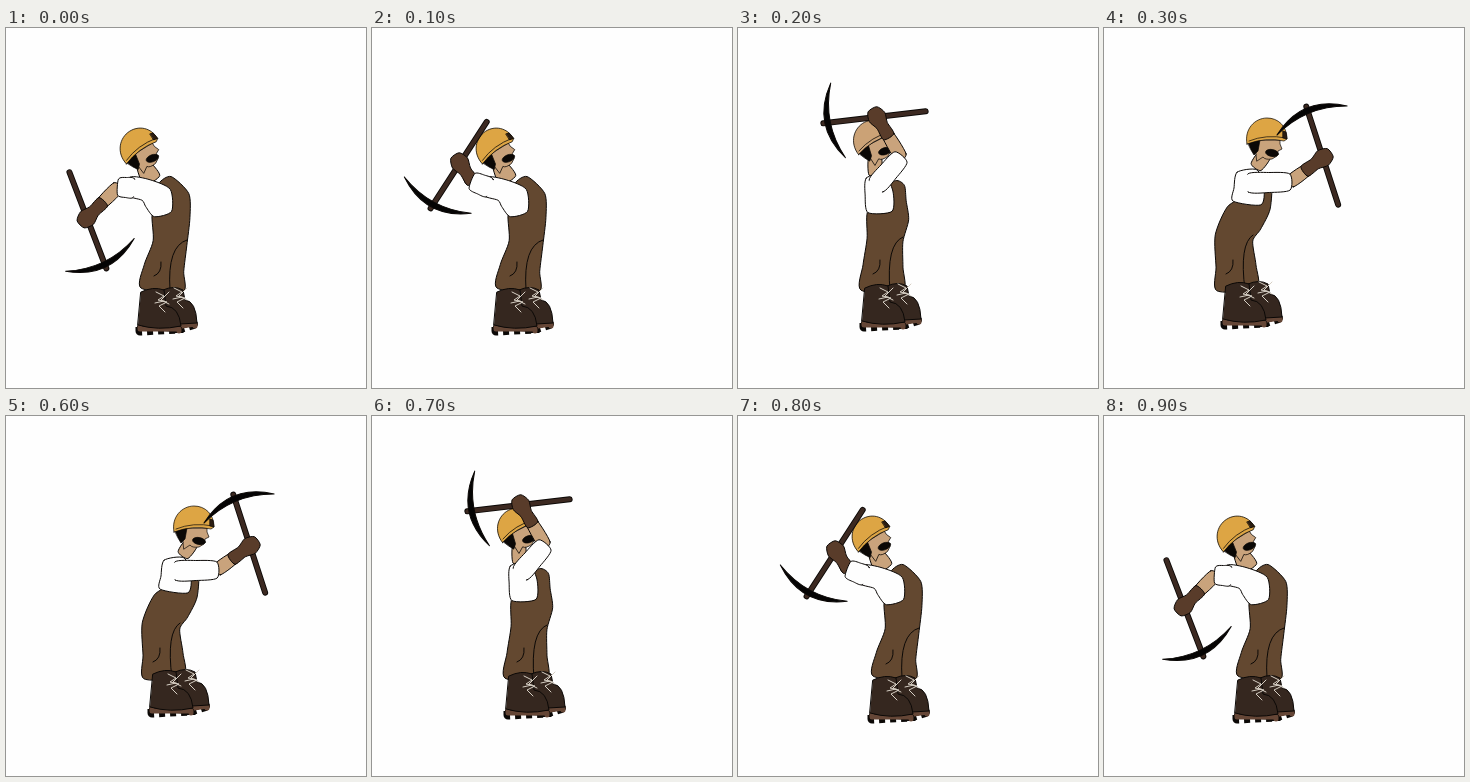
Animation, 360 px wide and 360 px high, one loop 1010 ms. Source, as an HTML page:

```html
<!DOCTYPE html>
<html>
<head>
<meta charset="utf-8">
<style>
html, body { margin: 0; width: 100%; height: 100%; overflow: hidden; background: #fefefe; }
svg { display: block; width: 100%; height: 100%; }
</style>
</head>
<body>
<svg id="stage" viewBox="0 0 360 360" stroke="#0b0806" stroke-linejoin="round" stroke-linecap="round"></svg>
<script>
const INK = '#0b0806', CLOTH = '#634830', GLOVE = '#593c2a', SKIN = '#c9a37c', SHIRT = '#fefefe',
      BOOT = '#35271f', SOLE = '#654636', WOOD = '#3c2921', HAT = '#dda544', DULL_HAT = '#cba276';

const path = (d, fill = 'none', extra = '') => `<path d="${d}" fill="${fill}" ${extra}/>`;
const at = (x, y, content, turn = 0) => `<g transform="translate(${x} ${y}) rotate(${turn})">${content}</g>`;

// Smooth closed outline around a centre line of [x, y, radius]
function tube(line, fill) {
  const side = sign => line.map(([x, y, r], i) => {
    const a = line[Math.max(i - 1, 0)], b = line[Math.min(i + 1, line.length - 1)];
    const dx = b[0] - a[0], dy = b[1] - a[1], k = sign * r / Math.hypot(dx, dy);
    return [x - dy * k, y + dx * k];
  });
  const edge = [...side(1), ...side(-1).reverse()];
  const p = i => edge[(i + edge.length) % edge.length];
  const d = edge.map((b, i) => {
    const a = p(i - 1), c = p(i + 1), e = p(i + 2);
    const lead = b.map((v, j) => v + (c[j] - a[j]) / 8);
    const tail = c.map((v, j) => v - (e[j] - b[j]) / 8);
    return `C${lead} ${tail} ${c}`;
  });
  return path(`M${edge[0]}${d.join('')}Z`, fill);
}

// The grip is the origin; the handle points along x
const pick =
  path('M-54,0H49', 'none', 'stroke-width="6"') +
  path('M-54,0H49', 'none', `stroke="${WOOD}" stroke-width="4.2"`) +
  at(-54, 0, path('M15,-38Q-12,0 15,38Q-1,0 15,-38Z', '#050404'), -4.5);

const lace = path('M150,264l8,4 -6,4 9,2 -8,4 6,6M163,264l-8,8 8,4M149,275l9,-2',
  'none', 'stroke="#d6cfc4" stroke-width="1"');

const sole = (from, to) =>
  path(`M${from}L${to}`, 'none', 'stroke-width="6"') +
  path(`M${from}l0,4L${to}l0,4`, 'none', 'stroke-width="9" stroke-dasharray="6 5" stroke-linecap="butt"') +
  path(`M${from}l0,2L${to}l0,2`, 'none', `stroke="${SOLE}" stroke-width="5"`);

const boots =
  sole([176, 296], [189, 296]) +
  path('M157,262Q168,257 177,262L179,272Q190,273 191,295L174,296 160,283Z', BOOT) +
  sole([134, 299], [173, 301]) +
  path('M135,264Q147,258 158,262L160,278Q173,279 175,298Q152,303 132,297Z', BOOT) +
  lace + at(18, -4, lace);

const head = hat =>
  path('M-11,-3L14,-3 14,1 16,6 12,8 11,13 6,16Q-1,17 -3,14L-9,18Z', SKIN) +
  path('M-18,0L-6,-3 -8,8 -12,12 -15,7Z', INK) +
  at(6, 10, `<ellipse rx="6.5" ry="3.5" fill="${INK}"/>`, 10) +
  path('M-19,1C-22,-14 -11,-25 1,-25C12,-25 21,-17 21,-4L18,-2Q0,-6 -19,1Z', hat) +
  path('M-17,-2Q0,-9 20,-5') +
  path('M17,-12L20,-11 21,-4 17,-5Z', '#2b1d12');

function arm([sx, sy], [cx, cy], [hx, hy]) {
  const reach = Math.hypot(hx - cx, hy - cy);
  const along = (d, r) => [hx + (hx - cx) * d / reach, hy + (hy - cy) * d / reach, r];
  return tube([[cx, cy, 6], along(-15, 5)], SKIN) +
    tube([along(-23, 6), along(-10, 6), along(0, 9), along(9, 5)], GLOVE) +
    tube([[sx, sy, 9], [(sx + cx) / 2, (sy + cy) / 2, 10], [cx, cy, 8]], SHIRT) +
    `<circle cx="${sx}" cy="${sy}" r="8.5" fill="${SHIRT}" stroke="none"/>`;
}

function folds([[x0, y0], [x1, y1], [x2, y2, r2]]) {
  return path(`M${x2 + r2},${y2 - 3}Q${x1 + 3},${y1 - 22} ${x0 + 8},${y0}M${x1 - 10},${y1 + 8}q8,-3 7,-14`);
}

function miner({ torso, shirt, neck, face, feet, shoulder, cuff, hand, swing, hat = HAT, shift = 0 }) {
  const [hx, hy, tilt] = face;
  return at(shift, 0,
    tube(torso, CLOTH) + folds(torso) + at(...feet, boots) +
    tube([[hx, hy + 10, 6], neck], SKIN) + tube(shirt, SHIRT) +
    at(hx, hy, `<g stroke-width=".7">${head(hat)}</g>`, tilt) +
    at(...hand, pick, swing) + arm(shoulder, cuff, hand));
}

// Body centre lines run from the ankles up
const back = {
  torso: [[156, 262, 21], [158, 240, 20], [164, 215, 17], [165, 188, 19], [168, 168, 15], [159, 152, 7]],
  shirt: [[122, 158, 9], [140, 162, 11], [152, 170, 15], [157, 186, 9]],
  neck: [146, 152, 9], face: [136, 125, -32], feet: [0, 0],
  shoulder: [128, 160], cuff: [112, 159], hand: [81, 190], swing: -111
};
const halfway = { ...back, cuff: [110, 153], hand: [98, 135], swing: -57 };
const raised = {
  torso: [[154, 263, 21], [155, 238, 20], [157, 212, 18], [160, 188, 21], [165, 168, 14], [172, 155, 5]],
  shirt: [[147, 148, 9], [151, 165, 14], [152, 184, 12]],
  neck: [147, 147, 6], face: [147, 117, -27], feet: [2, -4],
  shoulder: [148, 158], cuff: [173, 129], hand: [149, 89], swing: -6.7
};
const strike = {
  torso: [[117, 262, 20], [116, 238, 20], [114, 210, 19], [124, 190, 20], [138, 174, 14], [147, 150, 5]],
  shirt: [[127, 143, 10], [129, 160, 15], [127, 175, 14]],
  neck: [136, 139, 6], face: [146, 115, 0], feet: [-29, -6],
  shoulder: [128, 155], cuff: [152, 183], hand: [184, 213], swing: 150.4
};
const lifting = { ...strike, shift: 41, cuff: [170, 154], hand: [203, 130], swing: 72 };

const timeline = [
  [0, back],
  [100, { ...halfway, shift: -10 }],
  [200, { ...raised, shift: -10, hat: DULL_HAT }],
  [300, { ...lifting, shift: 16 }],
  [400, strike],
  [600, lifting],
  [700, raised],
  [800, halfway],
  [900, { ...back, shift: -1 }]
];

const stage = document.getElementById('stage');
stage.innerHTML = timeline.map(([, pose]) => miner(pose)).join('');
const layers = [...stage.children];
const began = performance.now();

function tick() {
  const time = (performance.now() - began) % 1010;
  const current = timeline.findLastIndex(([start]) => start <= time);
  layers.forEach((layer, i) => layer.style.display = i === current ? '' : 'none');
  requestAnimationFrame(tick);
}
tick();
</script>
</body>
</html>
```
